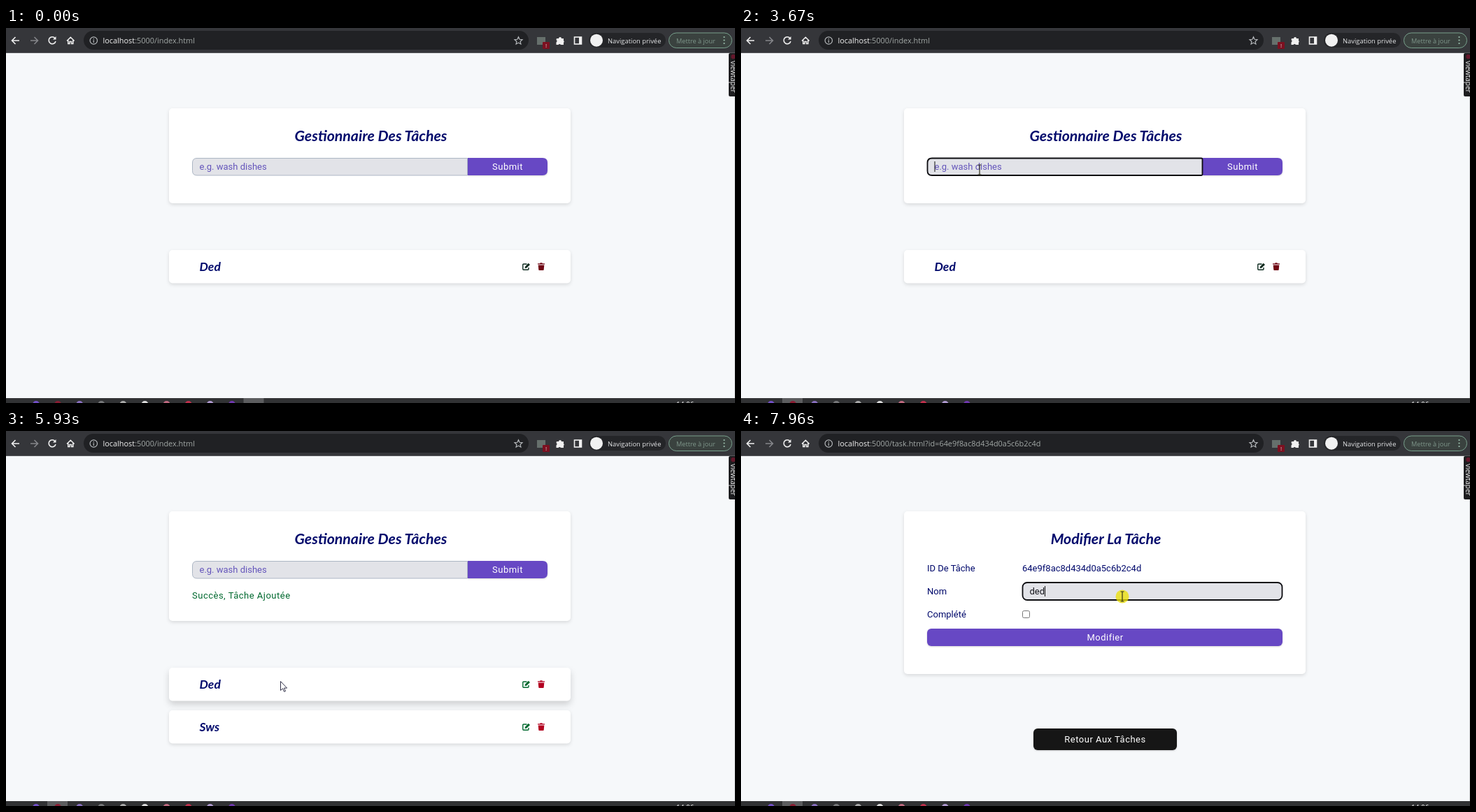
These frames come from a looping animation (1042x537 px, 8 s). An HTML page:

```html
<!DOCTYPE html>
<html lang="fr">
<head>
<meta charset="utf-8">
<title>Gestionnaire Des Tâches</title>
<style>
html, body { margin: 0; width: 100%; height: 100%; overflow: hidden; background: #f6f8fa; }
svg { display: block; width: 1042px; height: 537px; font: 13px Roboto, sans-serif; }
.ui { font-family: "Open Sans", "Noto Sans", sans-serif; }
.script { font-family: Pacifico, Lato, cursive; font-weight: 700; font-style: italic; }
.spaced { letter-spacing: .5px; }
.mid { text-anchor: middle; }
.navy { fill: #020a6c; }
.card { fill: #fff; filter: drop-shadow(0 2px 2.5px rgba(0, 0, 0, .12)); }
.card.raised { filter: drop-shadow(0 5px 5px rgba(0, 0, 0, .16)); }
.button { fill: #6748c4; filter: drop-shadow(0 1px 1px rgba(0, 0, 0, .16)); }
.line { fill: none; stroke: #f1f1f1; stroke-width: 1.6; }
</style>
</head>
<body>
<svg viewBox="0 0 1042 537">
  <rect width="1042" height="537" fill="#f6f8fa"/>
  <path d="M1041.5 36V530" stroke="#cfd1d4"/>
  <g id="page"></g>

  <g class="ui">
    <rect width="1042" height="36" fill="#35363a"/>
    <path d="M0 35.5H1042" stroke="#56575a"/>
    <rect x="111" y="4" width="636" height="27" rx="13.5" fill="#202124"/>
    <g class="line">
      <path d="M19 18H9M13.5 13 8.5 18 13.5 23"/>
      <path d="M35 18H45M40.500 13 45.500 18 40.500 23" stroke="#85868a"/>
      <path d="M70 14.500A5 5 0 1 0 71 19"/>
      <path d="M71.500 12V16.500H67Z" fill="#f1f1f1" stroke="none"/>
      <path d="M87 18.500 92.300 13.300 97.600 18.500M88.800 17.500V22.500H91V19.500H93.600V22.500H95.800V17.500" stroke-width="1.500"/>
      <g stroke="#b5b8bb" stroke-width="1.200">
        <circle cx="125.300" cy="18" r="5.200"/>
        <path d="M125.300 17.300V21M125.300 15V16.200"/>
        <path d="M732.500 12.700 734.100 16.300 738 16.700 735.100 19.300 735.900 23.100 732.500 21.100 729.100 23.100 729.900 19.300 727 16.700 730.900 16.300Z"/>
      </g>
      <rect x="812.500" y="13" width="10" height="10"/>
    </g>
    <path d="M819 13H823V23H819Z" fill="#f1f1f1"/>
    <rect x="759" y="13" width="12" height="11" fill="#66706c"/>
    <rect x="767" y="20" width="10" height="10" rx="1" fill="#7c1020"/>
    <text class="mid" x="772" y="28" font-size="8" fill="#ddd">!</text>
    <path d="M787 15H790A2 2 0 0 1 794 15H797V18A2 2 0 0 1 797 21V24H793A2 2 0 0 0 789.500 24H786.500V20.500A2 2 0 0 0 786.500 17Z" fill="#f1f1f1"/>
    <rect x="833" y="7" width="110" height="21" rx="10.500" fill="#242528"/>
    <circle cx="844" cy="17.700" r="9" fill="#f1f1f1"/>
    <text x="860" y="21.500" font-size="9.400" fill="#e4e5e7">Navigation privée</text>
    <rect x="947.500" y="7" width="90" height="21.500" rx="10.700" fill="#3a423f" stroke="#78a08c"/>
    <text x="958" y="21.500" font-size="9.200" fill="#7f978b">Mettre à jour</text>
    <path d="M1026.500 13V23" stroke="#9cc0ae" stroke-width="2.200" stroke-linecap="round" stroke-dasharray="0 4.500"/>
    <text id="url" x="138.500" y="22" font-size="10.900" fill="#a2a8a6"></text>

    <rect x="1033" y="36" width="14" height="62" rx="2" fill="#1d1d1f"/>
    <circle cx="1039.500" cy="41" r="3.200" fill="#64172b"/>
    <text transform="translate(1036 47) rotate(90)" font-size="10" fill="#f1f1f1">viewtaper</text>

    <rect y="530" width="1042" height="7" fill="#313234"/>
    <rect id="activeApp" y="530" width="29" height="7" fill="#5c5d5f"/>
    <g id="apps"></g>
    <text x="958" y="543" font-size="10" fill="#f1f1f1">14:06</text>
  </g>
  <g id="overlay"></g>
</svg>

<script>
const LOOP = 8000, TASK_ID = '64e9f8ac8d434d0a5c6b2c4d';
const CLICK_INPUT = 3470, BLUR = 4620, ADDED = 4970, LISTED = 5450, OPENED = 7020, LOADED = 7160, CLICK_NAME = 7960;
const HIDDEN = [[0, 790], [880, 1090]];
const CLICKS = [[CLICK_INPUT, 3580], [BLUR - 70, BLUR + 70], [6880, OPENED], [CLICK_NAME, LOOP]];
// time, x, y
const MOVES = [
  [790, 930, 523], [880, 930, 523], [1090, 928, 524], [1600, 756, 420], [1830, 766, 393],
  [1900, 766, 380], [2040, 764, 222], [2320, 560, 117], [2660, 277, 220], [2860, 277, 220],
  [3330, 341, 203], [3990, 341, 203], [4340, 730, 194], [4970, 730, 194], [5180, 638, 266],
  [5730, 332, 312], [5790, 340, 320], [5930, 392, 358], [6070, 392, 358], [6600, 746, 362],
  [6880, 746, 362], [7500, 541, 214], [7640, 541, 214], [7770, 545, 237]
];
const KEYS = [[3690, 's'], [3800, 'sw'], [3990, 'sws']];

const get = id => document.getElementById(id);
const within = (t, spans) => spans.some(([a, b]) => t >= a && t < b);
const inBox = ([x, y], l, top, r, b) => x >= l && x <= r && y >= top && y <= b;
const clamp = v => Math.max(0, Math.min(1, v));
const pen = document.createElement('canvas').getContext('2d');
const textWidth = s => { pen.font = '13px Roboto, sans-serif'; return pen.measureText(s).width; };

const text = (x, y, s, cls = 'navy', extra = '') => `<text x="${x}" y="${y}" class="${cls}" ${extra}>${s}</text>`;
const rect = (x, y, w, h, r, attrs) => `<rect x="${x}" y="${y}" width="${w}" height="${h}" rx="${r}" ${attrs}/>`;
const card = (y, h, raised) => rect(233, y, 574, h, 5, `class="card${raised ? ' raised' : ''}"`);
const title = s => text(521.5, 162, s, 'script navy mid', 'font-size="21.3"');
const caret = (x, y) => `<path d="M${x} ${y}v15" stroke="#111"/>`;

function pointer(t) {
  const i = MOVES.findIndex(m => m[0] > t);
  if (i < 1) return MOVES[i < 0 ? MOVES.length - 1 : 0].slice(1);
  const [t0, x0, y0] = MOVES[i - 1], [t1, x1, y1] = MOVES[i];
  const k = (t - t0) / (t1 - t0);
  return [x0 + (x1 - x0) * k, y0 + (y1 - y0) * k];
}

function row(y, name, bright, raised) {
  const green = bright ? '#00692f' : '#0d2b1f', red = bright ? '#b30020' : '#700714';
  return card(y, 47.5, raised) + text(276.5, y + 30, name, 'script navy', 'font-size="17.5"') +
    `<g transform="translate(738 ${y + 18})" fill="${green}">
      <path d="M6.500 2H1.800Q.8 2 .8 3V9.300Q.8 10.200 1.800 10.200H8Q9 10.200 9 9.300V7" fill="none" stroke="${green}" stroke-width="1.400"/>
      <path d="M3.500 8 4 5.700 8.700 .7 11 3 6 7.700Z"/></g>
    <path transform="translate(760 ${y + 18})" fill="${red}"
      d="M0 1.300H3L3.600 .2H6.400L7 1.300H10V2.600H0ZM.7 3.400H9.300L8.700 10Q8.600 11 8 11H2Q1.400 11 1.300 10Z"/>`;
}

function listPage(t, at) {
  const added = t >= ADDED, focus = t >= CLICK_INPUT && t < BLUR;
  const typed = added ? '' : KEYS.filter(k => t >= k[0]).map(k => k[1]).pop() || '';
  const shade = Math.min(clamp((t - 4200) / 200), clamp((5400 - t) / 200)) * .12;
  const button = 'M660 186H767Q774 186 774 193V204Q774 211 767 211H660Z';
  const top = added ? 339 : 318;
  return card(115, added ? 157 : 136) + title('Gestionnaire Des Tâches') +
    `<path class="button" d="${button}"/><path d="${button}" opacity="${shade}"/>
    <path d="${focus
      ? 'M273 186.500H658Q659.500 186.500 659.500 188V209.500Q659.500 211 658 211H273Q266.500 211 266.500 204.500V193Q266.500 186.500 273 186.500Z'
      : 'M273 186.500H659.500V211H273Q266.500 211 266.500 204.500V193Q266.500 186.500 273 186.500Z'}"
      fill="#e2e3e8" stroke="${focus ? '#0c0c10' : '#acb6c4'}" stroke-width="${focus ? 1.8 : 1}"/>` +
    text(276.5, 203, typed || 'e.g. wash dishes', '', `fill="${typed ? '#15151c' : '#6455bb'}"`) +
    (focus ? caret(277 + textWidth(typed), 191) : '') +
    text(717, 203, 'Submit', 'mid spaced', 'fill="#fff"') +
    (added ? text(266, 239.5, 'Succès, Tâche Ajoutée', 'spaced', 'fill="#00692f"') : '') +
    (added && t < LISTED ? text(233, 313, 'Loading...') : '') +
    row(top, 'Ded', added, added && inBox(at, 233, top, 807, top + 47)) +
    (t >= LISTED ? row(400, 'Sws', true) : '');
}

function taskPage(t) {
  const focus = t >= CLICK_NAME, loaded = t >= LOADED;
  return card(115, 233) + title('Modifier La Tâche') +
    text(266, 200.5, 'ID De Tâche') + text(266, 234, 'Nom') + text(266, 267, 'Complété') +
    (loaded ? text(402, 200.5, TASK_ID) : '') +
    rect(402.5, 217, 371, 25, 6.5, `fill="#e2e3e8" stroke="${focus ? '#0c0c10' : '#acb6c4'}" stroke-width="${focus ? 1.8 : 1}"`) +
    (loaded ? text(412.5, 234, 'ded', '', 'fill="#15151c"') : '') +
    (focus ? caret(413 + textWidth('ded'), 222) : '') +
    rect(402.5, 257.5, 10, 10, 2, 'fill="#fff" stroke="#767676"') +
    rect(266, 283, 508, 25, 6, 'class="button"') + text(520.5, 300, 'Modifier', 'mid spaced', 'fill="#fff"') +
    rect(418, 426, 205, 31, 6, 'class="button" style="fill:#161616"') +
    text(520.5, 446, 'Retour Aux Tâches', 'mid spaced', 'fill="#fff"');
}

const ARROW = '<path d="M.5 .5V13.500L3.600 10.700 5.600 15.300 7.500 14.500 5.500 10.100H9.600Z" fill="#fff" stroke="#33334a"/>';
const BEAM = '<path d="M-2.500-7H2.500M0-7V7M-2.500 7H2.500" stroke="#33331c" stroke-width="1.200"/>';
const HAND = `<path d="M-1.400 1.200Q-1.200-.4 0-.4 1.300-.4 1.400 1.200V6.500Q3 5.800 3.800 7 5.400 6.500 6 7.800 8 7.500 8 9.500V12Q8 14.500 6.400 16V18H-.6V16
  Q-3 13.800-4.600 10.800-5.400 9.200-4.200 8.800-3 8.500-1.400 10.500Z" fill="#fff" stroke="#444450" stroke-width=".9"/>`;

function cursor(t, at) {
  if (within(t, HIDDEN)) return '';
  const list = t < OPENED;
  const beam = list ? inBox(at, 266, 186, 660, 211) : inBox(at, 402, 217, 774, 242);
  const hand = list && (inBox(at, 660, 186, 774, 211) || t >= ADDED && inBox(at, 736, 355, 772, 374));
  return `<g transform="translate(${at})">` +
    (within(t, CLICKS) ? '<circle r="9.500" fill="#ece000" opacity=".75"/>' : '') +
    (beam ? BEAM : hand ? HAND : ARROW) + '</g>';
}

const status = t => t < 6580 || t >= OPENED ? '' :
  rect(-5, 512.5, 255, 17.5, 3, 'fill="#96989a"') +
  text(0, 524.5, 'localhost:5000/task.html?id=' + TASK_ID, 'ui', 'font-size="9.200" fill="#fff"');

get('apps').innerHTML = ['#7350c8', '#8a1d33', '#8a70c0', '#77787a', '#aaa', '#ddd', '#c06a80', '#c0304c', '#b09ad0', '#7038b0']
  .map((c, i) => `<circle cx="${43 + i * 31.1}" cy="539" r="5" fill="${c}"/>`).join('');

const shown = {};
function put(id, html) {
  if (shown[id] !== html) get(id).innerHTML = shown[id] = html;
}

function draw(now) {
  const t = now % LOOP, at = pointer(t), list = t < OPENED;
  put('page', list ? listPage(t, at) : taskPage(t));
  put('url', `<tspan fill="#f1f1f1">localhost</tspan>:5000/${list ? 'index.html' : 'task.html?id=' + TASK_ID}`);
  put('overlay', status(t) + cursor(t, at));
  get('activeApp').setAttribute('x', t < CLICK_INPUT ? 339.5 : 59);
  requestAnimationFrame(draw);
}
requestAnimationFrame(draw);
</script>
</body>
</html>
```
